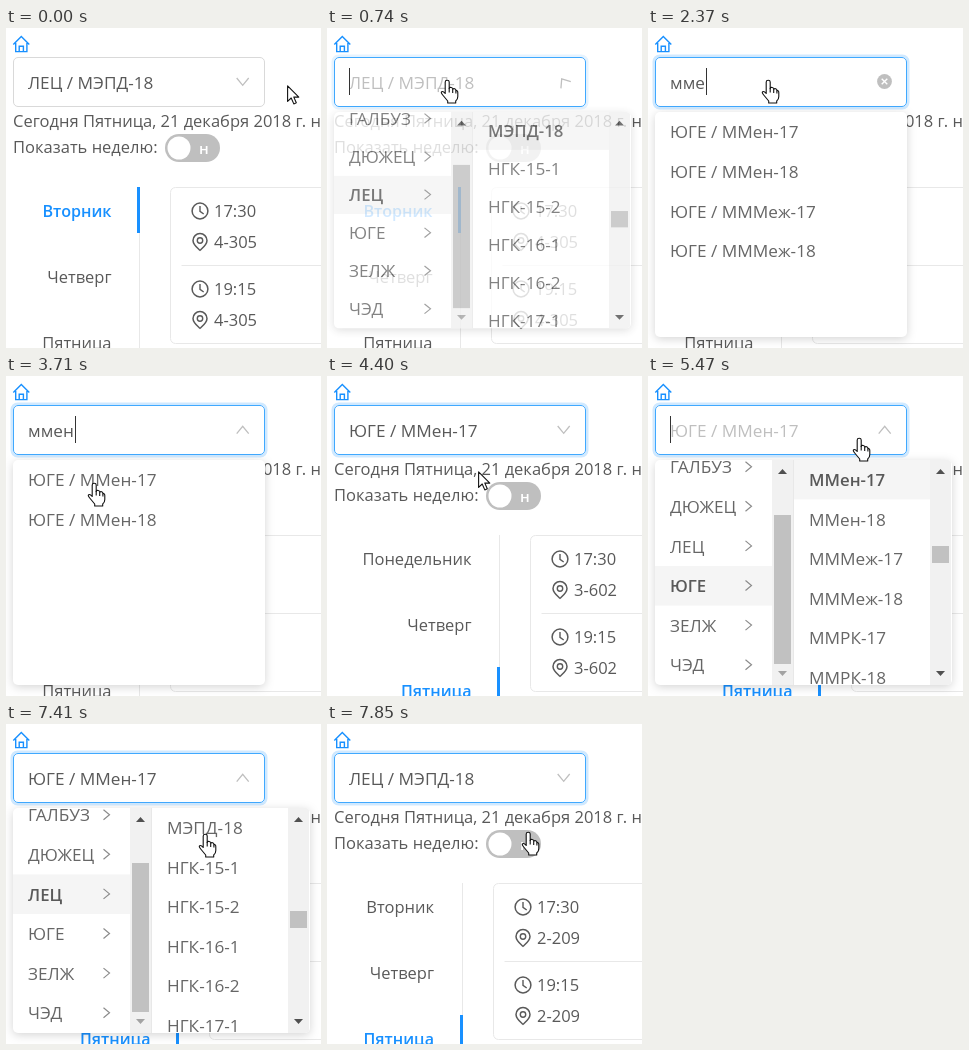
Animation, 315 px wide and 320 px high, one loop 7880 ms. Source, as an HTML page:

```html
<!DOCTYPE html>
<html lang="ru">
<head>
<meta charset="utf-8">
<title>Расписание</title>
<style>
  html, body { margin: 0; width: 100%; height: 100%; overflow: hidden; background: #fff; }
  svg { display: block; width: 315px; height: 320px; font: 16.5px "Open Sans", "Noto Sans", sans-serif; }
  text { fill: #595959; white-space: pre; }
  .picker { font-size: 17.2px; }
  .panel text { fill: #666; }
</style>
</head>
<body>
<svg id="stage" viewBox="0 0 315 320" xmlns="http://www.w3.org/2000/svg"></svg>
<script>
const LOOP = 7880;
const BLUE = '#1890ff', GREY = '#bfbfbf', RULE = '#e8e8e8', INK = '#595959';
const ROW = 39.6, TOP = 84, BOTTOM = 309;
const stage = document.getElementById('stage');
const pen = document.createElement('canvas').getContext('2d');
pen.font = '17.2px "Open Sans", "Noto Sans", sans-serif';

const FACULTIES = ['ГАЛБУЗ', 'ДЮЖЕЦ', 'ЛЕЦ', 'ЮГЕ', 'ЗЕЛЖ', 'ЧЭД'];
const GROUPS = {
  ЛЕЦ: ['МЭПД-18', 'НГК-15-1', 'НГК-15-2', 'НГК-16-1', 'НГК-16-2', 'НГК-17-1'],
  ЮГЕ: ['ММен-17', 'ММен-18', 'МММеж-17', 'МММеж-18', 'ММРК-17', 'ММРК-18']
};
const FIRST = 'ЛЕЦ / МЭПД-18', SECOND = 'ЮГЕ / ММен-17';

// Schedule states: start time, first day, active tab, label edge, rule, card, room
const PAGES = [
  { from: 0, day: 'Вторник', tab: 0, edge: 105.5, rule: 133, card: 164.5, room: '4-305' },
  { from: 4130, day: 'Понедельник', tab: 2, edge: 144.5, rule: 172, card: 203.5, room: '3-602' },
  { from: 7550, day: 'Вторник', tab: 2, edge: 107, rule: 135, card: 166.5, room: '2-209' }
];
const TYPED = [[1860, 'м'], [1990, 'мм'], [2370, 'мме'], [2650, 'ммен']];
const CARET_OFF = [[1120, 1630], [3190, 3710], [5850, 6400]];

// Pointer hotspot: time, x, y
const PATH = [
  [50, 281, 57], [600, 120, 52], [3340, 120, 52], [3570, 88, 107], [4030, 88, 107],
  [4400, 151, 95], [4730, 219, 75], [4780, 219, 75], [4880, 219, 62], [5060, 219, 62],
  [5220, 211, 62], [5500, 211, 62], [5800, 92, 135], [6160, 76, 171], [6310, 76, 171],
  [6450, 75, 165], [6640, 75, 165], [7050, 189, 112], [7230, 199, 110], [7410, 199, 110],
  [7700, 201, 108]
];

const within = (t, a, b) => t >= a && t < b;
const ramp = (t, a, b) => Math.max(0, Math.min(1, (t - a) / (b - a)));
const easeOut = p => 1 - (1 - p) ** 3;
const smooth = p => p * p * (3 - 2 * p);
const lastOf = (list, test) => list.filter(test).pop();

const text = (x, y, s, extra = '') => `<text x="${x}" y="${y}" ${extra}>${s}</text>`;
const rect = (x, y, w, h, fill, extra = '') =>
  `<rect x="${x}" y="${y}" width="${w}" height="${h}" fill="${fill}" ${extra}/>`;
const line = (d, color, width = 1, extra = '') =>
  `<path d="${d}" fill="none" stroke="${color}" stroke-width="${width}" ${extra}/>`;

function clock(x, y) {
  return `<circle cx="${x}" cy="${y}" r="7.9" fill="none" stroke="${INK}" stroke-width="1.5"/>` +
    line(`M${x} ${y - 5}v5.4l3.7 2.6`, INK, 1.4);
}

function pin(x, y) {
  return line(`M${x} ${y + 8.3}C${x - 3} ${y + 5.5} ${x - 7} ${y + 2.5} ${x - 7} ${y - 1.6}` +
    `a7 6.8 0 0 1 14 0C${x + 7} ${y + 2.5} ${x + 3} ${y + 5.5} ${x} ${y + 8.3}Z`, INK, 1.5) +
    `<circle cx="${x}" cy="${y - 1.5}" r="2.7" fill="none" stroke="${INK}" stroke-width="1.4"/>`;
}

function header() {
  return line('M7.3 16.5L15.3 8.6l8 7.9M9.7 15v8.6h11.2V15M13.2 23.6v-5.3h4.2v5.3', BLUE, 1.4) +
    text(7, 99, 'Сегодня Пятница, 21 декабря 2018 г. н') +
    text(7, 125, 'Показать неделю:') +
    rect(159, 106, 55, 28, GREY, 'rx="14"') +
    '<circle cx="173" cy="120" r="11.5" fill="#fff"/>' +
    text(193, 125.5, 'н', 'style="fill:#fff;font-size:15px;font-weight:600"');
}

function schedule(t) {
  const page = lastOf(PAGES, p => t >= p.from);
  const { card, rule, edge, tab } = page;
  const slide = page === PAGES[1] ? smooth(ramp(t, page.from, page.from + 260)) : 1;
  const on = `style="fill:${BLUE};font-weight:600;font-size:16.1px"`;
  const days = [page.day, 'Четверг', 'Пятница'].map((day, i) =>
    text(edge, 189 + 66 * i, day, 'text-anchor="end" ' + (i === tab ? on : ''))).join('');
  const lessons = ['17:30', '19:15'].map((time, i) => {
    const y = 183 + 78 * i;
    return clock(card + 29.5, y) + text(card + 43.5, y + 6, time) +
      pin(card + 29.5, y + 31) + text(card + 43.5, y + 37, page.room);
  }).join('');
  return days + line(`M${rule + .5} 159V320`, RULE) +
    rect(rule - 2, 159 + 66 * tab * slide, 3, 46, BLUE) +
    rect(card, 159.5, 200, 156, '#fff', `rx="5" stroke="${RULE}"`) +
    line(`M${card + 11} 237.5H315`, RULE) + lessons;
}

function field(t, open, query) {
  const hover = ramp(t, 180, 480), glow = ramp(t, 610, 850);
  const mix = (a, b) => Math.round(a + (b - a) * hover);
  const border = `rgb(${mix(217, 64)},${mix(217, 169)},${mix(217, 255)})`;
  const searching = within(t, 610, 1860) || within(t, 5250, 6400);
  const value = within(t, 4000, 7420) ? SECOND : FIRST;
  const caretX = 22.5 + (query ? Math.round(pen.measureText(query).width) + 1 : 0);
  const caret = (searching || query) && !CARET_OFF.some(([a, b]) => within(t, a, b));
  const suffix = within(t, 1860, 3400)
    ? `<circle cx="236.5" cy="53.5" r="7.4" fill="${GREY}"/>` +
      line('M233.7 50.7l5.6 5.6m0-5.6l-5.6 5.6', '#fff', 1.4)
    : line('M230.7 50l6 7.3l6-7.3', GREY, 1.3, `transform="rotate(${180 * open} 236.7 53.8)"`);
  return rect(5.75, 27.75, 254.5, 52.5, 'none', `rx="6" stroke="${BLUE}" stroke-width="2.5" opacity="${.2 * glow}"`) +
    rect(7.5, 29.5, 251, 49, '#fff', `rx="4.5" stroke="${border}"`) +
    text(22, 60.5, query || value, 'class="picker"' + (searching ? ` style="fill:${GREY}"` : '')) +
    (caret ? line(`M${caretX} 40V67`, '#333') : '') + suffix;
}

function scrollbar(x, thumbY, thumbH, atEnd) {
  return rect(x, TOP, 21, BOTTOM - TOP, '#f1f1f1') + rect(x + 2, thumbY, 17, thumbH, '#c1c1c1') +
    `<path d="M${x + 6} 98h9l-4.5-5z" fill="#505050"/>` +
    `<path d="M${x + 6} 295h9l-4.5 5z" fill="${atEnd ? '#a3a3a3' : '#505050'}"/>`;
}

function rows(list, x, firstY, left, width, active, chevrons) {
  return list.map((label, i) => {
    const y = firstY + ROW * i;
    return (label === active ? rect(left, y - ROW / 2, width, ROW, '#f5f5f5') : '') +
      text(x, y + 6.3, label, label === active ? `style="fill:${INK};font-weight:600;font-size:16.8px"` : '') +
      (chevrons ? line(`M97.5 ${y - 5.3}l6 5l-6 5`, '#8c8c8c', 1.2) : '');
  }).join('');
}

function searchList(query) {
  const found = query === 'м'
    ? ['ЛЕЦ / МЭПД-18', ...GROUPS.ЮГЕ.slice(0, 5).map(g => 'ЮГЕ / ' + g)]
    : GROUPS.ЮГЕ.filter(g => g.toLowerCase().includes(query)).map(g => 'ЮГЕ / ' + g);
  return rows(found, 22, 104, 7, 252) + (found.length > 5 ? scrollbar(238, 103, 172) : '');
}

function cascade(t) {
  const faculty = within(t, 5000, 6400) ? 'ЮГЕ' : 'ЛЕЦ';
  const group = t < 5000 ? 'МЭПД-18' : t < 6400 ? 'ММен-17' : '';
  return rows(FACULTIES, 22, 91, 7, 117, faculty, true) +
    scrollbar(124, 139, 149, true) + line(`M145.5 ${TOP}V${BOTTOM}`, RULE) +
    rows(GROUPS[faculty], 161, 103.6, 146, 136, group) +
    scrollbar(282, faculty === 'ЛЕЦ' ? 187 : 170, 17);
}

function dropdown(t, open, query) {
  if (!open) return '';
  const listMode = within(t, 1860, 4300);
  const w = listMode ? 252 : 297;
  return `<g class="picker panel" opacity="${open}" transform="translate(0 ${TOP}) scale(1 ${.8 + .2 * open}) translate(0 ${-TOP})">` +
    `<clipPath id="panel">${rect(7, TOP, w, BOTTOM - TOP, '#fff', 'rx="5"')}</clipPath>` +
    rect(7, TOP, w, BOTTOM - TOP, '#fff', 'rx="5" style="filter:drop-shadow(0 2px 5px rgba(0,0,0,.17))"') +
    `<g clip-path="url(#panel)">${listMode ? searchList(query || 'ммен') : cascade(t)}</g></g>`;
}

function pointerAt(t) {
  const next = PATH.findIndex(k => k[0] > t);
  if (next === 0) return PATH[0].slice(1);
  if (next < 0) return PATH[PATH.length - 1].slice(1);
  const [ta, xa, ya] = PATH[next - 1], [tb, xb, yb] = PATH[next];
  const p = smooth(ramp(t, ta, tb));
  return [xa + (xb - xa) * p, ya + (yb - ya) * p];
}

function pointer(t, open) {
  const [x, y] = pointerAt(t);
  const inField = x > 7 && x < 259 && y > 29 && y < 79;
  const inToggle = x > 159 && x < 214 && y > 106 && y < 134;
  const inPanel = open > .5 && x < 304 && y >= 79;
  const style = 'fill="#fff" stroke="#111" stroke-linejoin="round"';
  return inField || inToggle || inPanel
    ? `<g transform="translate(${x - 6.8} ${y - .5})" ${style} stroke-width="1.1">` +
      '<path d="M5 14V2.5Q5 .7 7 .7T9 2.5V9Q9 7.5 11 8T12.5 10Q13 8.7 14.5 9.3T15.7 11.3Q17.5 10.5 17.6 13V17Q17.6 20 15.5 21.5V23.5H7.5V21.5Q5 18.5 2.5 15.5Q.3 13 1.5 12.2Q3 11.5 5 14Z"/>' +
      '<path d="M9 8.5V13M12.5 10V13.5M15.7 11.3V14" fill="none"/></g>'
    : `<path transform="translate(${x} ${y})" ${style} stroke-width="1.1" d="M.6.8V16.4L4.2 13L6.8 18.9L9.3 17.8L6.8 12.1H11.8Z"/>`;
}

function draw(t) {
  const open = t < 4300
    ? easeOut(ramp(t, 610, 920)) * (1 - ramp(t, 4000, 4200))
    : easeOut(ramp(t, 5250, 5440)) * (1 - ramp(t, 7420, 7620));
  const query = t < 4000 ? (lastOf(TYPED, k => t >= k[0]) || [])[1] : '';
  stage.innerHTML = header() + schedule(t) + field(t, open, query) +
    dropdown(t, open, query) + pointer(t, open);
}

const start = performance.now();
function tick() {
  draw((performance.now() - start) % LOOP);
  requestAnimationFrame(tick);
}
tick();
</script>
</body>
</html>
```
